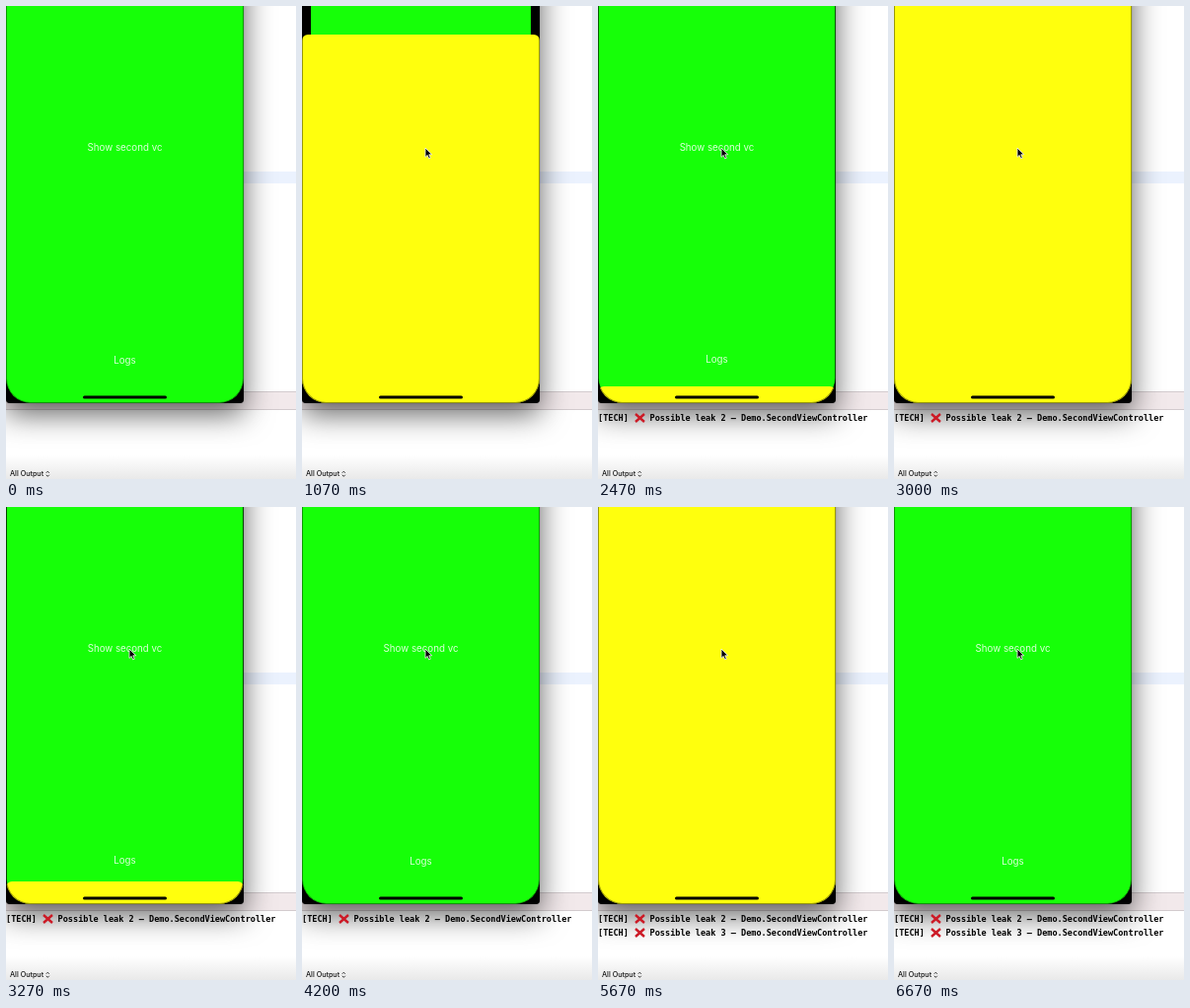
An HTML page for the animation above (7340 ms loop, 294 by 480 pixels).

```html
<!DOCTYPE html>
<html lang="en">
<meta charset="utf-8">
<title>Sheet leak demo</title>
<style>
  html, body { margin: 0; width: 100%; height: 100%; overflow: hidden; background: #fff; }
  #stage { position: relative; width: 294px; height: 480px; overflow: hidden; background: #fff; }
  #stage * { position: absolute; box-sizing: border-box; }
  .line { left: 0; width: 294px; height: 12px; top: 168px; background: #ebf2fe; }
  .bar { left: 0; width: 294px; top: 391px; height: 19px; background: #f2e9eb; border: solid #d3cbce; border-width: 1px 0; }
  .footer { left: 0; width: 294px; top: 456px; height: 24px; background: linear-gradient(#fff, #e9e9e9); }
  .footer span { left: 4px; top: 13px; font: 500 7.2px/10px Inter, sans-serif; color: #111; white-space: nowrap; transform: translateY(.5px); }
  .footer svg { left: 40px; top: 15px; }
  #phone { left: 0; top: -117px; width: 241px; height: 520px; background: #000; border-radius: 4px;
    box-shadow: 0 11px 30px rgba(0, 0, 0, .62), 0 0 1px rgba(0, 0, 0, .6); }
  #screen { inset: 0; overflow: hidden; border-radius: 25px; }
  #screen::after { content: ""; position: absolute; inset: 0; border: 1px solid rgba(0, 0, 0, .4); border-radius: 25px; }
  #first { inset: 0; background: #16ff08; border-radius: 6px 6px 25px 25px; }
  #first span { left: 0; width: 100%; text-align: center; font: 9.75px/12px Inter, sans-serif; color: rgba(255, 255, 255, .86); }
  #second { left: 0; top: 0; width: 100%; height: 520px; background: #ffff0d; border-radius: 6px 6px 0 0; }
  .home { left: 78px; top: 395px; width: 85px; height: 3px; border-radius: 2px; background: #000; transform: translateY(.5px); }
  .log { left: 0; height: 12px; white-space: pre; font: bold 8.54px/12px "DejaVu Sans Mono", monospace; color: #000; }
  .log span { left: 52.6px; top: 0; }
  .log svg { left: 36.5px; top: 1px; }
  #cursor { left: 124px; top: 143px; }
</style>
<div id="stage">
  <div class="line"></div>
  <div class="bar"></div>
  <div class="footer"><span>All Output</span>
    <svg width="5" height="8" fill="none" stroke="#222" stroke-width=".9"><path d="M.8 2.8l1.5-1.6 1.5 1.6M.8 4.8l1.5 1.6 1.5-1.6"/></svg>
  </div>
  <div id="phone"><div id="screen">
    <div id="first">
      <span style="top:255px">Show second vc</span>
      <span style="top:471px">Logs</span>
    </div>
    <div id="second"></div>
  </div></div>
  <div class="home"></div>
  <svg id="cursor" width="10" height="14"><path d="M1 1v9.4l2.2-2 1.5 3.5 1.6-.7-1.5-3.4h2.9z" stroke="#fff" stroke-width=".8"/></svg>
</div>
<script>
const LOOP = 7340, TICK = 200 / 3;
const PRESENT = [906, 2450, 5310];
const DISMISS = [1392, 2992, 5735];
const LOGS = [{ at: 2460, n: 2, y: 412 }, { at: 5320, n: 3, y: 426 }];
const SCREEN_TOP = -117, OPEN_Y = -82, CLOSED_Y = 403;
const $ = id => document.getElementById(id);

for (const log of LOGS) {
  log.el = document.createElement('div');
  log.el.className = 'log';
  log.el.style.top = log.y + 'px';
  log.el.innerHTML = '[TECH]' +
    '<svg width="11" height="10" stroke="#cc1a26" stroke-width="2.4"><path d="M1 1l9 8M10 1l-9 8"/></svg>' +
    `<span>Possible leak ${log.n} – Demo.SecondViewController</span>`;
  $('stage').append(log.el);
}

// Critically damped spring from 0 to 1
function spring(ms) {
  const x = Math.max(0, ms) * .0175;
  return 1 - (1 + x) * Math.exp(-x);
}

function draw(now) {
  const ms = now % LOOP;
  const t = Math.floor((ms + 4) / TICK) * TICK;
  let open = 0;
  PRESENT.forEach((start, i) => open += spring(t - start) - spring(t - DISMISS[i]));

  const y = CLOSED_Y + (OPEN_Y - CLOSED_Y) * open;
  $('second').style.transform = `translateY(${y - SCREEN_TOP}px)`;
  $('second').style.visibility = open > .001 ? 'visible' : 'hidden';
  $('first').style.transform = open > .001 ? `scale(${1 - .0975 * open})` : 'none';
  $('cursor').style.visibility = t > 0 ? 'visible' : 'hidden';
  for (const log of LOGS) log.el.style.visibility = t >= log.at ? 'visible' : 'hidden';
}

const begin = performance.now();
function loop() {
  draw(performance.now() - begin);
  requestAnimationFrame(loop);
}
loop();
</script>
</html>
```
